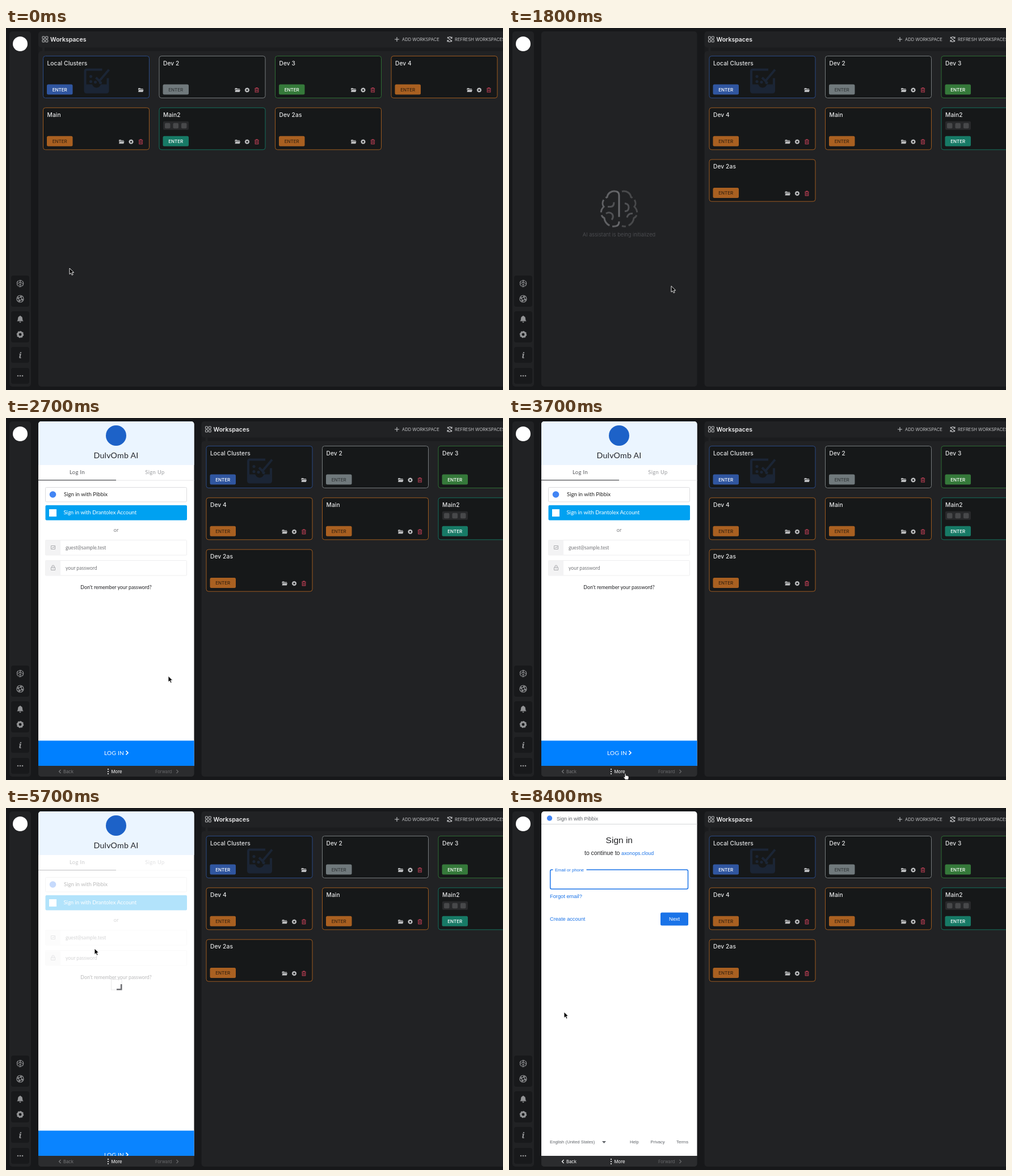
An HTML page for the animation above (8600 ms loop, 876 by 639 pixels).

```html
<!DOCTYPE html>
<html lang="en">
<head>
<meta charset="utf-8">
<title>Workspaces</title>
<style>
html, body { margin: 0; width: 100%; height: 100%; overflow: hidden; background: #17181a; }
svg { display: block; width: 876px; height: 639px; font-family: Inter, sans-serif; }
.lock { font-family: Lato, sans-serif; }
.account { font-family: "Liberation Sans", Arial, sans-serif; }
</style>
</head>
<body>
<svg id="stage" viewBox="0 0 876 639"></svg>
<script>
const LOOP = 8600, OPEN = 287.5;
const clamp = v => Math.max(0, Math.min(1, v));
const span = (t, a, b) => clamp((t - a) / (b - a));
const easeInOut = p => p < .5 ? 4 * p ** 3 : 1 - 4 * (1 - p) ** 3;

// Markup helpers
const rect = (x, y, w, h, fill, rx = 0, more = '') =>
  `<rect x="${x}" y="${y}" width="${w}" height="${h}" rx="${rx}" fill="${fill}" ${more}/>`;
const text = (x, y, s, size, fill, more = '') =>
  `<text x="${x}" y="${y}" font-size="${size}" fill="${fill}" ${more}>${s}</text>`;
const centered = (x, y, s, size, fill, more = '') =>
  text(x, y, s, size, fill, 'text-anchor="middle" ' + more);
const line = (d, stroke, width = 1, more = '') =>
  `<path d="${d}" fill="none" stroke="${stroke}" stroke-width="${width}" ${more}/>`;
const shape = (d, fill, more = '') => `<path d="${d}" fill="${fill}" ${more}/>`;
const circle = (x, y, r, fill, more = '') => `<circle cx="${x}" cy="${y}" r="${r}" fill="${fill}" ${more}/>`;
const at = (x, y, body, more = '') => `<g transform="translate(${x} ${y})" ${more}>${body}</g>`;

// Icons, centred on 0,0
const gear = (r, color) =>
  circle(0, 0, r * .68, 'none', `stroke="${color}" stroke-width="${r * .55}"`) +
  circle(0, 0, r * .95, 'none', `stroke="${color}" stroke-width="${r * .2}" pathLength="16" stroke-dasharray="1 1"`);
const folder = shape('M-4.5 -2.5Q-4.5 -3.5 -3.5 -3.5H-1L0 -2.5H3.5Q4.3 -2.5 4.3 -1.3H-3.5L-4.5 1ZM-3.4 -.6H5L3.8 3.5H-4.5Z', '#bdbec0');
const trash = line('M-3.7 -2.8H3.7M-1.3 -3V-4H1.3V-3M-2.8 -2.5V3.8H2.8V-2.5M-1 -1V2.3M1 -1V2.3', '#b03c50', 1.1);
const smallBrain = circle(0, 0, 5.7, 'none', 'stroke="currentColor" stroke-width="1.2" stroke-dasharray="5.2 .8"') +
  line('M0 -5.5V5.5M-5.5 0H-3Q-2 0 -2 -2M5.5 0H3Q2 0 2 -2M-2.8 3.5L0 1.5L2.8 3.5M-2 -2.4H2', 'currentColor');
const bell = shape('M0 -6.3Q1 -6.3 1 -5.2Q4 -4.5 4 -.8Q4 2 5.7 3.6H-5.7Q-4 2 -4 -.8Q-4 -4.5 -1 -5.2Q-1 -6.3 0 -6.3ZM-1.7 4.5H1.7Q1.2 6.2 0 6.2Q-1.2 6.2 -1.7 4.5Z', '#929395');
const lifebuoy = circle(0, 0, 6, 'none', 'stroke="#929395" stroke-width="1.2"') +
  circle(0, 0, 2.6, 'none', 'stroke="#929395" stroke-width="1.2"') +
  circle(0, 0, 4.2, 'none', 'stroke="#929395" stroke-width="1.8" pathLength="8" stroke-dasharray="1 1"');
const tiles = [[-5, -5], [.8, -5], [-5, .8], [.8, .8]]
  .map(([x, y]) => rect(x, y, 4, 4, 'none', .4, 'stroke="#c4c5c7"')).join('');

const sidebar = rect(6, 6, 38, 627, '#212224', 5) + circle(25, 28, 13, '#fff') +
  [[437, 55], [500, 55], [563, 28], [600, 28]].map(([y, h]) => rect(9, y, 32, h, '#18191b', 4)).join('') +
  at(25, 451, smallBrain, 'id="assistantIcon"') + at(25, 478, lifebuoy) + at(25, 514, bell) +
  at(25, 541, gear(6, '#929395')) +
  centered(25, 583, 'i', 15, '#929395', 'font-family="Noto Serif, serif" font-style="italic" font-weight="700"') +
  [-4, 0, 4].map(d => circle(25 + d, 614, 1.3, '#929395')).join('');

const COLORS = {
  blue: ['#2b4a85', '#3056a0', '#fff'],
  grey: ['#767b7d', '#70797c', '#33383a'],
  green: ['#2f6d35', '#35793a', '#fff'],
  orange: ['#9c5a20', '#a96021', '#3a2410'],
  teal: ['#156e5c', '#177a66', '#fff']
};
const CARDS = [['Local Clusters', 'blue'], ['Dev 2', 'grey'], ['Dev 3', 'green'], ['Dev 4', 'orange'],
  ['Main', 'orange'], ['Main2', 'teal'], ['Dev 2as', 'orange']];

const clusterArt = at(72, 22, line('M32 2H5Q2 2 2 5V39Q2 42 5 42H39Q42 42 42 39V17M2 30H13Q16 36 22 36Q28 36 31 30H42', '#1b2535', 4) +
  shape('M2 30H13Q16 36 22 36Q28 36 31 30H42V42H2Z', '#1b2535') +
  line('M21 16L27 22L44 2', '#1b2535', 4) +
  [[12, 14], [20, 24], [12, 23], [29, 25]].map(([x, y]) => circle(x, y, 2.6, '#1b2535')).join(''));

function card([name, tone], i) {
  const [border, button, label] = COLORS[tone];
  const extras = name === 'Local Clusters' ? clusterArt + at(172, 60, folder)
    : at(138, 60, folder) + at(155, 60, gear(4, '#bdbec0')) + at(172, 60, trash);
  const loading = name === 'Main2'
    ? rect(7, 24, 45, 15, '#28292b', 2) + [10, 24.5, 39].map(x => rect(x, 27, 9.5, 9.5, '#47484a', 2)).join('') : '';
  return `<g class="card">${rect(0, 0, 187, 74, '#161819', 4, `stroke="${border}"`)}${extras}${loading}
    ${text(7, 16, name, 10.2, '#e6e7e8', 'font-weight="500" letter-spacing=".1"')}
    ${rect(6.5, 50, 45.5, 18, button, 2.5)}
    ${centered(29.2, 62.2, 'ENTER', 8, label, 'font-weight="500"')}</g>`;
}

const content = `<g id="content">${rect(57, 6, 900, 40, '#1b1c1e', 5)}${rect(57, 6, 900, 28.5, '#212224', 5)}
  ${rect(57, 41, 900, 592, '#212224', 5)}${rect(64, 34, 4, 7, '#212224')}
  ${at(69, 20, tiles)}${text(78, 24, 'Workspaces', 10.5, '#f0f0f1', 'font-weight="600"')}</g>`;
const toolbar = line('M685 20H693M689 16V24', '#c4c5c7', 1.1) +
  text(698, 23, 'ADD WORKSPACE', 7.6, '#c4c5c7') +
  at(782, 20, line('M-4 -1.5A4.2 4.2 0 0 1 3.5 -2.4M4 1.5A4.2 4.2 0 0 1 -3.5 2.4M4 -4.5V-1.8H1.3M-4 4.5V1.8H-1.3M-4 -4L4 4', '#c4c5c7', 1.1)) +
  text(791, 23, 'REFRESH WORKSPACES', 7.6, '#c4c5c7');

const lobe = 'M-5 -31C-13 -33 -20 -28 -21 -21C-29 -18 -31 -9 -27 -4C-34 3 -33 13 -26 16C-25 26 -15 33 -5 30';
const brain = line(lobe, '#606164', 3, 'stroke-dasharray="24 5"') +
  line(lobe, '#48494b', 3, 'stroke-dasharray="24 5" transform="scale(-1 1)"') +
  line('M0 -24V14M-5 -31Q0 -30 0 -24M0 22Q0 29 -5 30', '#68696c', 3) +
  line('M-20 -4H-15Q-9 -4 -9 -12M-23 8Q-17 4 -12 9Q-9 14 -13 19M10 -10Q17 -9 17 -3Q17 4 10 4M24 8Q16 7 14 15', '#505154', 3);
const assistant = `<g id="assistant">${rect(57, 6, 274.5, 627, '#212224', 5, 'id="assistantBox"')}
  <g id="waiting">${at(194, 319.5, brain, 'id="brain"')}
  ${centered(194, 368, 'AI assistant is being initialized', 9.3, '#55565a', 'font-weight="300"')}</g></g>`;

const field = (y, label, icon) => rect(69.5, y, 249, 26.5, '#fff', 1, 'stroke="#eeeeef"') +
  rect(69.5, y, 26.5, 26.5, '#f3f3f4') + at(83, y + 13, icon) + text(105, y + 16.3, label, 8.7, '#747578');
const mailIcon = line('M-3.5 -3H3.5V3H-3.5ZM-2 1.5L0 -.5L1 .5L2.5 -1.5', '#a2a3a6', .9);
const lockIcon = line('M-3.5 -.7H3.5V4H-3.5ZM-2 -.7V-2.5A2 2 0 0 1 2 -2.5V-.7M0 1V2.4', '#a2a3a6', .9);

const login = `<g id="login" class="lock">${rect(57, 6, 275, 608, '#fff')}${rect(57, 6, 275, 77, '#ebf5ff')}
  ${circle(194, 31, 18, '#1d62c8')}${centered(194, 71, 'DulvOmb AI', 14.2, '#25272b', 'letter-spacing=".2"')}
  <g id="form">${centered(125.5, 99, 'Log In', 9.3, '#55575b', 'letter-spacing=".4"')}
  ${centered(262.5, 99, 'Sign Up', 9.3, '#9b9ca0', 'letter-spacing=".4"')}
  ${line('M57 110H332', '#e6e6e8')}${line('M57 109.7H194', '#54565a', 1.2)}
  ${rect(69.5, 122.5, 249, 25.5, '#fff', 2, 'id="firstButton" stroke="#dcdcde"')}
  ${circle(82.5, 135, 5.8, '#4285f4')}${text(102, 138.4, 'Sign in with Pibbix', 9.6, '#222')}
  ${rect(69.5, 154, 249.5, 26.5, '#00a1f1', 2, 'id="secondButton"')}
  ${rect(76, 161, 13, 13, '#fff')}${text(101.5, 170.2, 'Sign in with Drantolex Account', 9.5, '#fff')}
  ${centered(194, 200.5, 'or', 9, '#77787b')}
  ${field(215.5, 'guest@sample.test', mailIcon)}${field(251.5, 'your password', lockIcon)}
  ${centered(194, 302, 'Don\'t remember your password?', 8.8, '#1c1d20')}</g>
  ${rect(57, 569.5, 275, 45, '#0080ff', 0, 'id="submit"')}
  <g id="submitLabel">${text(173, 594.6, 'LOG IN', 10.2, '#fff', 'letter-spacing=".2"')}${line('M211.5 587.5L215 591L211.5 594.5', '#fff', 1.7)}</g>
  <g id="spinners">${rect(185.5, 302.5, 18.5, 18.5, 'none', 0, 'stroke="#e9e9ea"')}
  <g id="corner">${line('M203.2 311V320.2H195', '#6e6f73', 2.6)}</g>
  <g id="ring">${circle(194, 591, 11, 'none', 'stroke="#66b3ff" stroke-width="2"')}${line('M194 580A11 11 0 0 1 205 591', '#fff', 2)}</g></g></g>`;

const account = `<g id="account" class="account">${rect(57, 6, 275, 608, '#fff')}
  ${circle(71.5, 18, 4.7, '#4285f4')}${text(84, 21.6, 'Sign in with Pibbix', 9, '#5f6368')}${line('M57 28.5H332', '#d5d7da')}
  ${centered(194.3, 62.3, 'Sign in', 15.5, '#202124')}
  ${text(133, 83.3, 'to continue to', 10.4, '#202124')}${text(198, 83.3, 'axonops.cloud', 8.9, '#1a73e8')}
  ${rect(72.7, 109, 242.8, 34, '#fff', 2.5, 'id="inputBox"')}
  <g id="inputLabel">${rect(77.5, 106, 59, 6, '#fff')}${text(81, 112, 'Email or phone', 7.6, '#1a73e8')}</g>
  ${text(81, 129, 'Email or phone', 9.8, '#5f6368', 'id="placeholder"')}
  ${text(72, 159, 'Forgot email?', 9.3, '#1a73e8')}${text(72, 199.3, 'Create account', 9.2, '#1a73e8')}
  ${rect(267, 184.5, 49, 23, '#1a73e8', 2.5)}${centered(291.5, 199.3, 'Next', 9.3, '#fff')}
  ${text(72, 592, 'English (United States)', 7.75, '#5f6368')}${shape('M164 588H171L167.5 592Z', '#5f6368')}
  ${text(213, 592, 'Help', 7.7, '#5f6368')}${text(249.5, 592, 'Privacy', 7.7, '#5f6368')}${text(316, 592, 'Terms', 7.7, '#5f6368', 'text-anchor="end"')}</g>`;

const nav = rect(57, 614, 275, 19, '#2b2c2e') +
  `<g id="back" color="#77787a">${line('M96.5 621L93.5 624L96.5 627', 'currentColor', 1.2)}${text(101, 627, 'Back', 7.7, 'currentColor')}</g>` +
  [620, 624, 628].map(y => circle(180, y, 1.1, '#fff')).join('') + text(185.5, 627, 'More', 7.8, '#fff') +
  text(263, 627, 'Forward', 7.6, '#67686a') + line('M300.5 621L303.5 624L300.5 627', '#67686a', 1.2);

const cursor = `<g id="cursor"><g id="arrow">${shape('M0 0V10.6L2.5 8.4L4.2 12.2L6.1 11.3L4.4 7.6H7.7Z', '#000', 'stroke="#fff" stroke-width=".9"')}</g>
  <g id="hand">${shape('M-1 .8Q0 -.6 1 .8V4.2Q2 3.4 2.8 4.5Q3.8 4 4.5 5Q6 4.8 6 6.4V8.6Q6 10 5 11.5H-.3Q-1 9.7 -3 7.4Q-3.3 5.8 -1.8 6.4L-1 7.2Z', '#fff', 'stroke="#111" stroke-width=".8"')}</g></g>`;

stage.innerHTML = `<clipPath id="panelClip">${rect(57, 6, 274.5, 627, '#fff', 5)}</clipPath>` + sidebar + content +
  `<g id="cards">${CARDS.map(card).join('')}</g>` + toolbar + assistant +
  `<g id="web" clip-path="url(#panelClip)">${login}${account}${nav}</g>` + cursor;

const $ = id => document.getElementById(id);
const set = (id, name, value) => $(id).setAttribute(name, value);
const show = (id, visible) => set(id, 'opacity', +visible);
const cards = document.querySelectorAll('.card');

// time, x, y of the pointer's tip
const PATH = [[0, 112, 424], [700, 21, 446], [900, 21, 446], [1100, 139, 481], [1700, 286, 455.5], [2900, 286, 455.5],
  [3700, 205, 627], [3800, 205, 627], [4700, 87, 106], [4900, 110, 132], [5100, 126, 160], [5300, 130, 136],
  [5600, 130, 136], [5700, 156, 248], [6100, 156, 248], [6200, 97, 360], [LOOP, 97, 360]];

function pointer(t) {
  const i = PATH.findIndex(p => p[0] > t);
  const [t0, x0, y0] = PATH[i - 1], [t1, x1, y1] = PATH[i];
  const p = span(t, t0, t1), s = p * p * (3 - 2 * p);
  return [x0 + (x1 - x0) * s, y0 + (y1 - y0) * s];
}

function draw(t) {
  const offset = OPEN * easeInOut(span(t, 1005, 1700));
  const columns = offset > 100 ? 3 : 4;
  set('content', 'transform', `translate(${offset} 0)`);
  cards.forEach((c, i) => c.setAttribute('transform',
    `translate(${65.5 + offset + i % columns * 204.5} ${49.5 + Math.floor(i / columns) * 91.3})`));

  set('assistantBox', 'width', Math.max(0, offset - 13));
  show('assistant', offset > 13);
  set('waiting', 'opacity', span(t, 1500, 1750));
  set('brain', 'opacity', 1 - span(t, 2200, 2450));

  // Sign-in page
  const loading = t >= 5700;
  set('web', 'opacity', span(t, 2430, 2600));
  show('login', t < 7600);
  set('form', 'opacity', loading ? .3 : 1);
  set('submit', 'fill', loading ? '#0a84ff' : '#0080ff');
  set('submitLabel', 'transform', `translate(0 ${t >= 5800 ? 40 : loading ? 21 : 0})`);
  show('spinners', loading);
  show('ring', t >= 5800);
  const turn = 90 * [6200, 6500, 6800, 7000].filter(step => t >= step).length;
  set('corner', 'transform', `rotate(${turn} 194.75 311.75)`);
  set('ring', 'transform', `rotate(${turn} 194 591)`);

  // Account page
  const focused = t >= 8400;
  show('account', t >= 7600);
  set('inputBox', 'stroke', focused ? '#1a73e8' : '#d5d7da');
  set('inputBox', 'stroke-width', focused ? 1.5 : 1);
  show('inputLabel', focused);
  show('placeholder', !focused);
  set('back', 'color', t >= 7600 ? '#fff' : '#77787a');

  const [x, y] = pointer(t);
  const onSidebar = t >= 600 && t < 1000, onMore = t >= 3600 && t < 3900;
  const onForm = t >= 4800 && t < 5700;
  const onFirst = onForm && y > 122 && y < 148, onSecond = onForm && y > 154 && y < 180;
  const pointing = onSidebar || onMore || onFirst || onSecond;
  set('assistantIcon', 'color', t >= 600 && t < 1200 ? '#d8d9db' : '#929395');
  set('firstButton', 'fill', onFirst ? '#f4f4f5' : '#fff');
  set('secondButton', 'fill', onSecond ? '#0092dc' : '#00a1f1');
  set('cursor', 'transform', `translate(${x} ${y})`);
  show('hand', pointing);
  show('arrow', !pointing);
}

const start = performance.now();
function tick() {
  const t = (performance.now() - start) % LOOP;
  draw(Math.floor(t / 100) * 100);
  requestAnimationFrame(tick);
}
tick();
</script>
</body>
</html>
```
